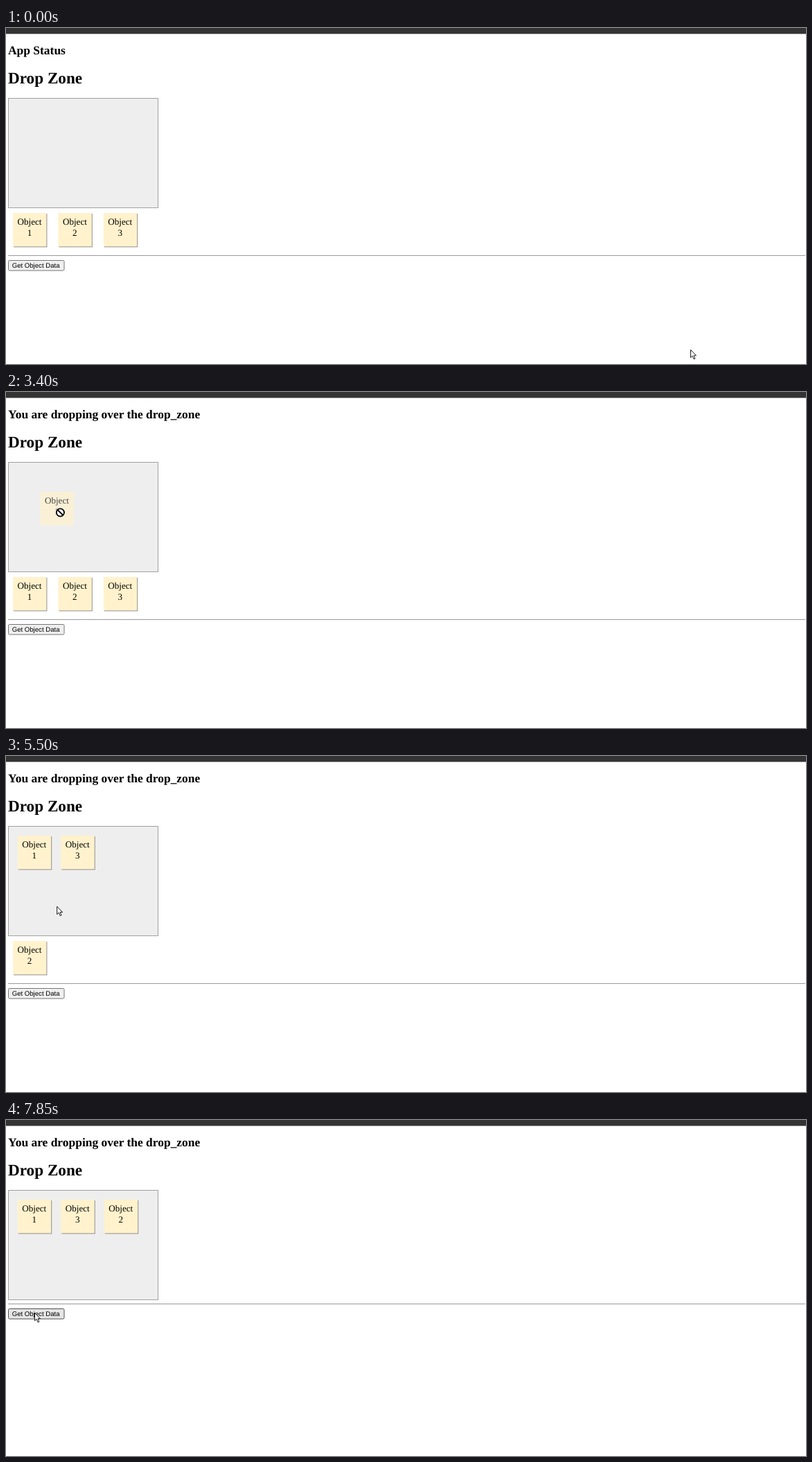
Recreate the animation shown at these times as an HTML page. Size 1155 by 485 pixels, loop 8 s.

```html
<!DOCTYPE html>
<html lang="en">
<head>
<meta charset="utf-8">
<title>Drag and drop</title>
<style>
  html, body { margin: 0; width: 100%; height: 100%; overflow: hidden; background: #fff; }
  svg { display: block; width: 1155px; height: 485px; }
  text { font-family: "Liberation Serif", "Times New Roman", serif; text-rendering: geometricPrecision; }
  .h1 { font-size: 23.2px; font-weight: bold; }
  .h2 { font-size: 17.45px; font-weight: bold; }
  .note text { font-size: 13.1px; text-anchor: middle; }
  .note rect { fill: #fff2cc; }
  #notes rect { filter: drop-shadow(1.5px 1.5px .5px #909090); }
  #ghost { opacity: .7; }
  #button rect { fill: #efefef; stroke: #767676; }
  #button.hover rect { fill: #e5e5e5; stroke: #4f4f4f; }
  #button text { font: 9.6px "Liberation Sans", Arial, sans-serif; }
  #cursor path { fill: #fff; stroke: #000; stroke-width: .9; }
  #blocked { fill: none; stroke: #000; stroke-width: 1.8; }
</style>
</head>
<body>
<svg viewBox="0 0 1155 485">
  <rect width="1155" height="8.5" fill="#333"/>
  <text id="status" class="h2" x="3" y="38.4">App Status</text>
  <text class="h1" x="3" y="79.5">Drop Zone</text>
  <rect x="3.5" y="101.5" width="216" height="158" fill="#eee" stroke="#a0a0a0"/>
  <g id="footer">
    <rect x="3" y="328" width="1151" height="1" fill="#999"/>
    <g id="button">
      <rect x="3.5" y="335.5" width="80.5" height="14.6" rx="1.8"/>
      <text x="8.7" y="346.3">Get Object Data</text>
    </g>
  </g>
  <g id="notes"></g>
  <g id="ghost" class="note"></g>
  <g id="cursor">
    <path id="arrow" d="M0 0V11.3L2.6 8.9L4.6 13.5L6.4 12.7L4.5 8.3H7.9Z"/>
    <path id="move" d="M0-7.8L3.2-4.5H1.3V-1.3H4.5V-3.2L7.8 0L4.5 3.2V1.3H1.3V4.5H3.2L0 7.8L-3.2 4.5H-1.3V1.3H-4.5V3.2L-7.8 0L-4.5-3.2V-1.3H-1.3V-4.5H-3.2Z"/>
    <g id="blocked">
      <circle r="6.6" fill="#fff" stroke="none"/>
      <circle r="5.6"/>
      <line x1="-4" y1="-4" x2="4" y2="4"/>
    </g>
  </g>
</svg>
<script>
const LOOP = 8000, TICK = 77, SIZE = 48.4;
const $ = id => document.getElementById(id);

// The pointer glides to each point in ticks; "carry" names the note it drags along
const glides = [
  { from: 70, to: 130, x: 170.5, y: 298.5 },
  { from: 360, to: 530, x: 65.5, y: 283.5 },
  { from: 680, to: 820, x: 46.5, y: 282.5 },
  { from: 1620, to: 1760, x: 59.5, y: 177.5, ease: 2 },
  { from: 2160, to: 2300, x: 174.5, y: 181.5 },
  { from: 2620, to: 3020, x: 39, y: 297 },
  { from: 3400, to: 3400, x: 78.4, y: 174, carry: 1, drop: 3710 },
  { from: 4110, to: 4260, x: 64.5, y: 288.5 },
  { from: 4410, to: 4650, x: 98, y: 289.5, ease: 1.4 },
  { from: 4950, to: 5180, x: 112.5, y: 159.5, ease: 1.2, carry: 3, drop: 5180 },
  { from: 5500, to: 5720, x: 15.5, y: 303.5, ease: .66 },
  { from: 5970, to: 6130, x: 26, y: 296 },
  { from: 6350, to: 6760, x: 95, y: 188.5, ease: .66, carry: 2, drop: 6760 },
  { from: 7010, to: 7320, x: 45.5, y: 314.5 },
  { from: 7390, to: 7770, x: 36.5, y: 281 },
  { from: 7850, to: 7850, x: 41.5, y: 278.5 }
];
const drags = glides.filter(g => g.carry);

function pointerAt(t) {
  const p = { x: 988.5, y: 464.5 };
  for (const { from, to, x, y, ease = 1 } of glides) {
    if (t < from) break;
    const gaps = Math.round((to - from) / TICK);
    const done = t >= to ? gaps : Math.floor((t - from) / (to - from) * gaps);
    const k = ((done + 1) / (gaps + 1)) ** ease;
    p.x += (x - p.x) * k;
    p.y += (y - p.y) * k;
  }
  return p;
}

// Dropped notes line up in the zone, the others close ranks in the tray
function layout(t) {
  const dropped = drags.filter(d => t >= d.drop).map(d => d.carry);
  const waiting = [1, 2, 3].filter(id => !dropped.includes(id));
  const places = {};
  dropped.forEach((id, i) => places[id] = { x: 16.8 + 62.5 * i, y: 115 });
  waiting.forEach((id, i) => places[id] = { x: 10 + 65.4 * i, y: 267 });
  return { dropped, waiting, places };
}

const noteMarkup = id => `<rect width="${SIZE}" height="${SIZE}"/>
  <text x="24" y="17.4">Object</text><text x="24" y="32.8">${id}</text>`;
const place = (el, { x, y }) => el.setAttribute("transform", `translate(${x} ${y})`);
const show = (el, on) => el.style.display = on ? "" : "none";
const inside = (p, x, y, w, h) => p.x >= x && p.x <= x + w && p.y >= y && p.y <= y + h;

$("notes").innerHTML = [1, 2, 3].map(id => `<g class="note">${noteMarkup(id)}</g>`).join("");
const notes = [...$("notes").children];
let ghostId = 0;

function draw(t) {
  const p = pointerAt(t);
  const { dropped, waiting, places } = layout(t);
  const drag = drags.find(d => t >= d.from && t < d.drop);
  const onNote = waiting.some(id => inside(p, places[id].x, places[id].y, SIZE, SIZE));
  const empty = !waiting.length;

  notes.forEach((el, i) => place(el, places[i + 1]));
  place($("footer"), { x: 0, y: empty ? -63 : 0 });
  $("button").classList.toggle("hover", empty && inside(p, 3, 272, 81, 16));

  show($("ghost"), drag);
  if (drag) {
    if (ghostId !== drag.carry) $("ghost").innerHTML = noteMarkup(ghostId = drag.carry);
    const grab = pointerAt(drag.from - 1), home = places[drag.carry];
    place($("ghost"), { x: home.x + p.x - grab.x, y: home.y + p.y - grab.y });
  }

  const status = drag && p.y > 259.5 ? "Dragging the object" + drag.carry
    : drag || dropped.length ? "You are dropping over the drop_zone" : "App Status";
  if ($("status").textContent !== status) $("status").textContent = status;

  place($("cursor"), p);
  const shape = drag ? "blocked" : onNote ? "move" : "arrow";
  for (const id of ["arrow", "move", "blocked"]) show($(id), id === shape);
}

function tick() {
  draw(performance.now() % LOOP);
  requestAnimationFrame(tick);
}
tick();
</script>
</body>
</html>
```
